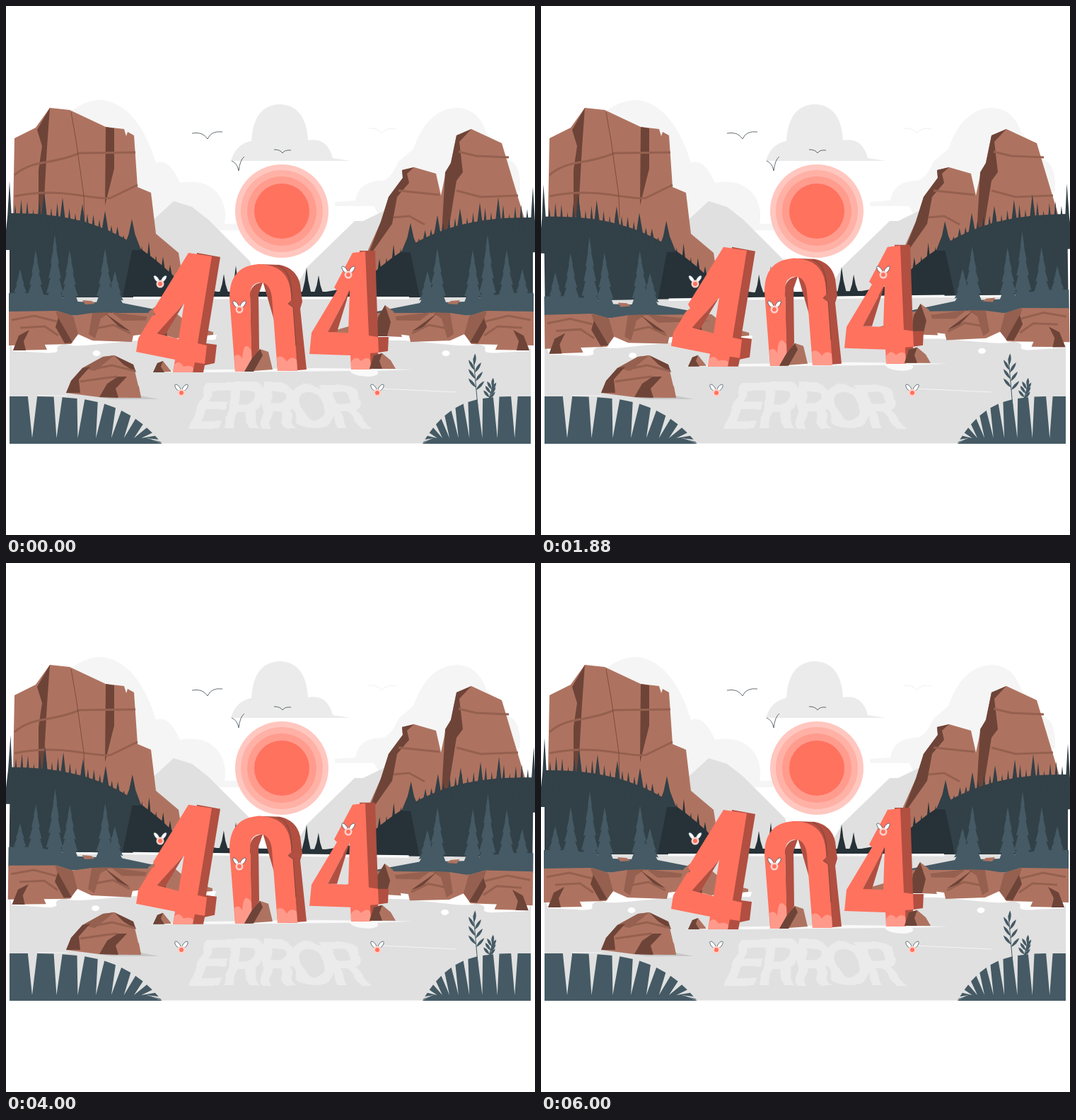
Recreate the animation shown at these times as an HTML page. Size 748 by 748 pixels, loop 6040 ms.

```html
<!DOCTYPE html>
<html lang="en">
<head>
<meta charset="utf-8">
<title>404 Error</title>
<style>
html,body{margin:0;width:100%;height:100%;overflow:hidden;background:#fff}
svg{display:block;width:100vw;height:100vh}
.rock{fill:#ae7360}.mid{fill:#95604f}.deep{fill:#6e4438}
.vein{fill:none;stroke:#95604f;stroke-width:3}
.thin{fill:none;stroke:#6e4438;stroke-width:.8}
.far{fill:#263238}.wood{fill:#324047}.near{fill:#455a64}
.red{fill:#ff725e}.side{fill:#b14f41}.pale{fill:#ff9a8b}
.foam{fill:#fff}.lake{fill:#e0e0e0}
#word{fill:#ebebeb;font:bold 88px Inter,Arial,sans-serif;text-anchor:middle}
</style>
</head>
<body>
<svg viewBox="0 0 748 748">
<defs>
  <filter id="ripple" x="-10%" y="-10%" width="120%" height="120%">
    <feTurbulence type="fractalNoise" baseFrequency=".01 .06" seed="4"/>
    <feDisplacementMap in="SourceGraphic" scale="14" xChannelSelector="R"/>
  </filter>
  <g id="forest"></g>
  <g id="bank">
    <path class="foam" d="M180 411H376V414.5H180Z"/>
    <path class="near" d="M4 406Q50 403 100 418L165 420 236 434 205 442 4 434Z"/>
    <g id="firs"></g>
    <path class="foam" d="M4 470L100 464 298 465 296 472 186 473 122 479Q95 482 84 478 69 480 73 487 72 492 50 490L10 488Z"/>
    <ellipse class="foam" cx="128" cy="491" rx="5.5" ry="4"/>
    <path class="rock" d="M4 432L72 431 95 438 122 434 240 434 262 452 293 461V465L240 470 213 462 180 466 178 475 122 473 102 464 92 478 4 480Z"/>
    <path class="mid" d="M70 431L95 438 102 464 92 476 78 456ZM122 434L148 433 134 442 126 470 117 464ZM149 433L240 444 165 445Z"/>
    <path class="deep" d="M74 441L94 476 83 477 70 454ZM140 434L176 460 161 455Z"/>
    <path class="vein" d="M8 444L40 438 72 446M20 455L55 453 74 466M126 456L152 451 176 463"/>
    <path class="rock" d="M10 487L18 466 33 458 50 468 58 486ZM190 468L202 432 214 423 228 447 233 466ZM108 416L121 417 126 421 112 422Z"/>
    <path class="deep" d="M33 458L25 474 28 487H10L18 466ZM214 423L206 447 211 467H228L224 440Z"/>
  </g>
</defs>

<!-- sky -->
<g fill="#f5f5f5">
  <path d="M88 152Q112 132 136 133 180 138 206 204L212 222Q230 214 246 250 285 243 303 270 313 288 309 308H331V317H200Z"/>
  <path d="M465 283V277L494 275Q498 247 533 247 545 243 555 220L576 202Q596 145 638 144 668 145 679 179 695 193 700 217 724 213 727 248V262H640L530 300 520 283Z"/>
</g>
<path fill="#ebebeb" d="M318 219Q325 195 347 191 350 140 387 139 424 140 427 190 454 185 462 215L487 219Z"/>
<circle cx="390" cy="290" r="66" fill="#ffc7bf"/>
<circle cx="390" cy="290" r="58" fill="#ffb1a6"/>
<circle cx="390" cy="290" r="49" fill="#ff9c8e"/>
<circle cx="390" cy="290" r="39" class="red"/>
<g fill="none" stroke="#263238" stroke-width=".7">
  <path d="M263 180Q278 177 285 188 290 176 306 178M379 203Q388 203 391 208 394 203 403 204M319 219Q327 222 329 233 331 217 337 213"/>
  <path d="M513 173Q526 172 531 180 538 171 552 174" stroke="#e9e9e9"/>
</g>
<path class="lake" d="M200 310L237 276 263 284 286 302 345 361 362 413H200ZM560 285L538 288 505 304H493L427 368 400 413H560Z"/>

<!-- cliffs -->
<path class="rock" d="M12 187L42 172 62 144 90 147 141 171 167 174 170 184 172 178 181 183 186 256 205 264 212 322 244 349 252 400H8Z"/>
<path class="deep" d="M62 144L44 175 51 198 46 232 46 305 53 290 58 200ZM141 171L153 173V230L140 282Z"/>
<path class="vein" d="M12 239Q28 225 55 221T104 208L183 207M12 269Q55 260 100 267T149 271L186 253"/>
<path class="thin" d="M92 150L99 190 110 268 111 300"/>
<path class="rock" d="M508 400L512 345 530 305 541 270 561 243 560 232 577 228 608 237 615 268 622 235 629 222 637 183 658 174 701 194 734 304V400Z"/>
<path class="deep" d="M560 232L577 228 567 237 570 250 553 270 546 308 508 362 530 305 541 270 561 243ZM637 183L658 174 641 192 646 235 637 247 625 322 616 322 621 235 629 222Z"/>
<path class="vein" d="M640 206L665 212 711 214M637 261L671 270 724 268M555 261L613 267M548 299L570 297 592 309"/>

<path class="lake" d="M5 412H742V618.5H5Z"/>

<g id="shore">
  <path class="far" d="M184 404H600V412H184Z"/>
  <use href="#forest"/><use href="#forest" transform="matrix(-1 0 0 .95 750 20.6)"/>
  <use href="#bank"/><use href="#bank" transform="matrix(-1 0 0 1 750 0)"/>
</g>

<!-- floating number -->
<g id="number">
  <path class="foam" opacity=".8" d="M202 518L236 515 440 512 575 514 525 516Q530 522 515 524 492 524 486 516L290 518Z"/>
  <path class="side" d="M270 349L303 355 283 477 298 479 295 505 281 508 279 518H258Z"/>
  <path class="red" fill-rule="evenodd" d="M258 349L291 354 271 477 284 480 281 506 267 504 264 518H236L239 500 184 489 187 470 206 439 211 436 208 430ZM252 420L214 463 244 471Z"/>
  <path class="side" d="M252 420L225 465 214 463Z"/>
  <path class="pale" d="M238 507Q245 500 251 510 261 507 265 512L264 518H236Z"/>

  <path class="side" d="M356 365L387 366Q411 371 416 394L419 418 416 428 425 514 400 516Z"/>
  <path class="side" d="M345 405Q350 391 363 391L357 408 358 485 347 505Z"/>
  <path class="red" d="M324 517L316 412Q316 366 360 365 397 367 402 400L404 417 399 421 406 426 412 516H384L376 412Q373 391 360 391 345 391 345 410L348 517Z"/>
  <path class="pale" d="M323 495Q330 490 334 499 336 470 347 487L348 517H324ZM383 497Q391 492 397 503 403 494 411 500L412 516H384Z"/>
  <path class="thin" d="M384 367Q405 373 404 416L399 421 406 426 410 480"/>

  <path class="side" d="M500 346L522 346 526 468 541 468 540 488 526 490 528 512 500 514Z"/>
  <path class="red" fill-rule="evenodd" d="M490 349L508 347 513 466 526 468 527 490 515 491 516 514H488L487 494 429 492 432 462 468 402 464 398ZM486 402L455 461 484 462Z"/>
  <path class="side" d="M486 402L468 461H455Z"/>
  <path class="pale" d="M488 503Q495 493 502 502 510 495 515 500L516 514H488Z"/>

  <path class="rock" d="M208 518L214 505 222 502 234 517ZM337 517L348 498 359 485 371 489 377 514ZM514 513L520 494 532 491 544 501 551 513Z"/>
  <path class="deep" d="M214 505L222 502 219 510 224 518H208ZM348 498L359 485 363 494 350 517H337ZM520 494L532 491 528 502 532 513H514Z"/>
</g>

<g id="word" filter="url(#ripple)"></g>

<!-- foreground -->
<path fill="#c7c7c7" d="M84 547L190 551 216 556 150 556Z"/>
<path stroke="#f5f5f5" d="M45 551H86M530 541L637 546"/>
<path class="rock" d="M85 547L92 530 108 512 137 496 153 494 180 507 191 554 132 553Z"/>
<path class="mid" d="M108 512L137 496 153 494 126 516Z"/>
<path class="deep" d="M85 547L92 530 108 512 119 510 103 528 105 547ZM153 494L180 507 184 518 166 507Z"/>
<path class="vein" d="M105 531L140 526 157 524M120 514L150 508 182 516"/>
<path class="rock" d="M132 553L143 534 158 524 175 523 188 538 191 554Z"/>
<path class="deep" d="M132 553L143 534 158 524 171 524 155 541 159 554Z"/>
<g id="grass" class="near"></g>
<g id="plant" class="near"></g>
<g id="flies"></g>
</svg>
<script>
const $ = id => document.getElementById(id);
const range = (n, f) => Array.from({length: n}, (_, i) => f(i));
const rnd = i => { const v = Math.sin(i * 12.9898) * 43758.5453; return v - Math.floor(v); };
const poly = (cls, pts) => `<path class="${cls}" d="M${pts.map(p => p.join(' ')).join('L')}Z"/>`;

// Forest: a falling ridge, random small spires and a row of tall ones
const ridge = x => 293 + 102 * (x / 250) ** 2.6;
const body = (from, to) => range(11, i => from + (to - from) * i / 10).map(x => [x, ridge(x)]);
const spire = (cls, x, y, base, w) =>
  poly(cls, [[x - w, base], [x - w * .35, (y + base) / 2], [x, y], [x + w * .35, (y + base) / 2], [x + w, base]]);
$('forest').innerHTML =
  poly('far', [...body(100, 250), [310, 406], [310, 412], [100, 412]]) +
  range(8, i => spire('far', 192 + 10 * i, ridge(190 + 10 * i) - 4 - 14 * rnd(i), 410, 11)).join('') +
  [308, 325].map((x, i) => spire('far', x, 379 - 12 * i, 408, 7)).join('') +
  poly('wood', [...body(5, 180), [165, 412], [5, 412]]) +
  range(20, i => spire('wood', 13 + 8.5 * i, ridge(13 + 8.5 * i) - 4 - 16 * rnd(i + 9), 345, 9)).join('') +
  [5, 54, 80, 108, 140, 178].map(x => spire('wood', x, 246 + .31 * x, 345, x < 9 ? 8 : 13)).join('');

// Fir with ragged tiers on both sides
function fir(x, y, base = 427, w = 15, tiers = 5) {
  const edge = s => range(tiers, i => {
    const k = (i + 1) / tiers, ty = y + (base - y) * k;
    return [[x + s * w * k, ty], [x + s * w * k * .7, ty - 1]];
  }).flat();
  return poly('near', [[x, y], ...edge(1), ...edge(-1).reverse()]);
}
$('firs').innerHTML = [[20, 372], [42, 345], [69, 323], [90, 345], [140, 343], [154, 375]].map(p => fir(...p)).join('');

// Grass: blades narrow and shorten away from the corner
const bladeX = i => 216 * (1 - (1 - i / 10) ** 1.9) + 5;
const bladeY = x => 552 + 66 * (x / 220) ** 4;
const blades = poly('near', [[5, 619], ...range(10, i => {
  const a = bladeX(i), c = bladeX(i + 1), b = a + (c - a) * .66, gap = (b + c) / 2;
  return [[a, bladeY(a)], [b, bladeY(b)], [gap - 13 * (gap / 180) ** 2, 611]];
}).flat(), [221, 619]]);
$('grass').innerHTML = blades + `<g transform="matrix(-.71 0 0 1 745.5 0)">${blades}</g>`;

// A stem with leaves in alternating pairs and one at the tip
const stem = (x, y, dx, dy, pairs, l) => {
  const leaf = (k, a) => `<path transform="translate(${x + dx * k} ${y + dy * k}) rotate(${a})" d="M0 0Q-4 ${-l / 2} 0 ${-l}Q4 ${-l / 2} 0 0"/>`;
  return `<path stroke="#455a64" d="M${x} ${y}l${dx} ${dy}"/>` + leaf(.85, 5) +
    range(pairs, i => leaf(.75 - .18 * i, -30 - 5 * i) + leaf(.7 - .18 * i, 32 + 5 * i)).join('');
};
$('plant').innerHTML = stem(667, 566, -6, -68, 3, 17) + stem(680, 566, 9, -32, 3, 13);

// Lettering fans out towards the viewer
$('word').innerHTML = [...'ERROR'].map((c, i) =>
  `<text transform="translate(${279 + 53 * i} 597) skewX(${10.5 * i - 22})">${c}</text>`).join('');

const fly = (x, y) => `<g transform="translate(${x} ${y})">` +
  [-1, 1].map(s => `<ellipse cx="${5 * s}" cy="-4" rx="2.6" ry="6" transform="rotate(${38 * s} ${5 * s} -4)" fill="#fff" stroke="#455a64" stroke-width=".8"/>`).join('') +
  '<circle cy="3" r="5.5" fill="#ffd2cb"/><circle cy="3" r="3" fill="#ff725e"/></g>';
$('flies').innerHTML = [[218, 390], [330, 426], [484, 377], [248, 544], [525, 544]].map(p => fly(...p)).join('');

const LOOP = 6040, CYCLE = 6000;
// Triangle wave: 0, 1, 0, -1, 0
const wave = p => 1 - Math.abs((p + .75) % 1 * 4 - 2);

function draw(now) {
  const sway = wave((now % LOOP / CYCLE + .5) % 1) * -1;
  $('shore').setAttribute('transform', `rotate(${sway} 373.5 370)`);
  $('number').setAttribute('transform', `translate(0 ${-11 * Math.abs(sway)})`);
  requestAnimationFrame(draw);
}
requestAnimationFrame(draw);
</script>
</body>
</html>
```
